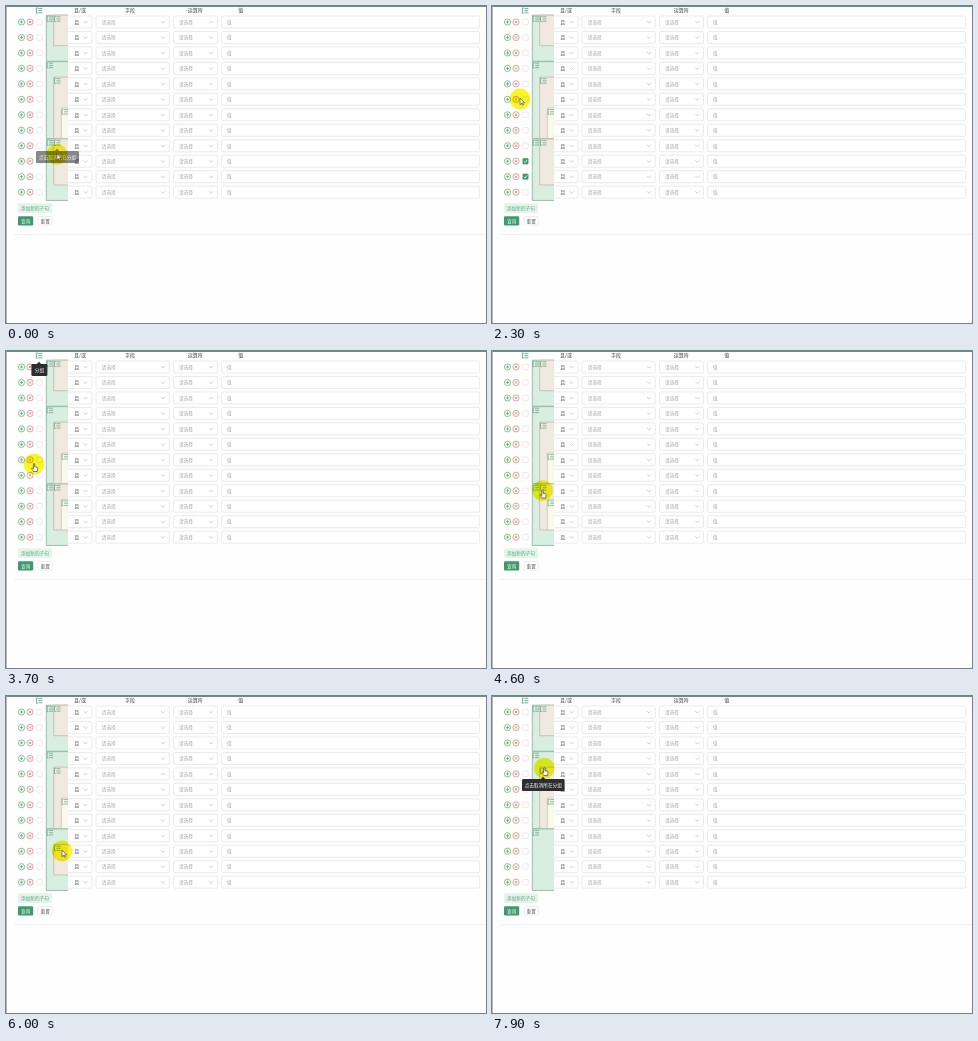
Write an HTML page that moves like this. It is 480x317 px and loops after 8000 ms.

```html
<!DOCTYPE html>
<html lang="zh-CN">
<head>
<meta charset="utf-8">
<title>条件分组</title>
<style>
html, body { margin: 0; width: 100%; height: 100%; overflow: hidden; background: #fefefe; }
svg { display: block; width: 100vw; height: 100vh; }
text { font-family: "Noto Sans CJK SC", "Noto Sans CJK", "Noto Sans CJK JP", sans-serif; font-size: 4.65px; }
#spot { mix-blend-mode: multiply; }
</style>
</head>
<body>
<svg id="stage" viewBox="0 0 480 317"></svg>
<script>
const LOOP = 8000, STEP = 100, PITCH = 15.47, ROWS = 12;
const GREEN = '#3d9a6c';
const stage = document.getElementById('stage');

function el(name, attrs, parent = stage) {
  const node = document.createElementNS('http://www.w3.org/2000/svg', name);
  for (const key in attrs) node.setAttribute(key, attrs[key]);
  parent.appendChild(node);
  return node;
}
const rect = (x, y, width, height, fill, more, parent) =>
  el('rect', { x, y, width, height, fill, ...more }, parent);
const path = (d, stroke, width, more, parent) =>
  el('path', { d, fill: 'none', stroke, 'stroke-width': width, ...more }, parent);
function label(str, x, y, fill, more, parent) {
  el('text', { x, y: y + 1.75, fill, ...more }, parent).textContent = str;
}
const show = (node, on) => node.setAttribute('visibility', on ? 'visible' : 'hidden');
const rowY = i => 16 + i * PITCH;
const edgeY = i => 9 + i * PITCH;

function listIcon(x, y, color, parent) {
  path(`M${x + 1.8} ${y + .4}h-1.4v5.2h1.4M${x + 2.4} ${y + .8}h4M${x + 2.4} ${y + 3}h4M${x + 2.4} ${y + 5.2}h4`,
    color, .75, {}, parent);
}

function box(x, y, w, chevron) {
  rect(x, y - 6, w, 12, '#fff', { rx: 1.6, stroke: '#dfe1e4', 'stroke-width': .65 });
  if (chevron) path(`M${chevron - 2} ${y - .9}l2 2l2-2`, '#b4b7bc', .65);
}

// Page frame and header
rect(0, 0, 480, .9, '#4d8873');
rect(0, 0, .8, 317, '#a3aaa7');
listIcon(30, 1.6, GREEN);
const bold = { 'text-anchor': 'middle', 'font-weight': 500, 'font-size': 5 };
[['且/或', 74], ['字段', 124], ['运算符', 189.3], ['值', 234.7]]
  .forEach(([str, x]) => label(str, x, 4, '#444', { ...bold, style: 'font-size:5px' }));

// Groups: depth, first row, row past the last, shown from, shown until
const FILLS = ['#d8eee0', '#f0e9e0', '#f8f9e9'];
const EDGES = ['#7fab95', '#b5b0a2', '#bcc0a6'];
const LEFTS = [40, 47.4, 55];
const groups = [
  [0, 0, 3], [1, 0, 2],
  [0, 3, 8], [1, 4, 8], [2, 6, 8],
  [0, 8, 12], [1, 8, 11, 0, 5000], [2, 9, 11, 3300, 5000], [1, 9, 11, 5000, 6700]
].map(([depth, a, b, from = 0, until = LOOP]) => {
  const node = el('g', {});
  const x = LEFTS[depth], y = edgeY(a), h = edgeY(b) - y;
  rect(x, y, 62 - x, h, FILLS[depth], {}, node);
  path(`M62 ${y + .2}H${x + .3}V${y + h - .2}H62`, EDGES[depth], .7, {}, node);
  listIcon(x + .7, y + 1, '#67a085', node);
  return { node, from, until };
});

// Condition rows
const ticks = [];
for (let i = 0; i < ROWS; i++) {
  const y = rowY(i);
  el('circle', { cx: 15.5, cy: y, r: 3.1, fill: '#fbfefb', stroke: '#60ae70', 'stroke-width': .75 });
  path(`M13.9 ${y}h3.2M15.5 ${y - 1.6}v3.2`, '#4d9d60', .7);
  el('circle', { cx: 24, cy: y, r: 3.1, fill: '#fffbfa', stroke: '#d28780', 'stroke-width': .75 });
  path(`M22.9 ${y - 1.1}l2.2 2.2m0-2.2l-2.2 2.2`, '#c87169', .7);
  rect(30.8, y - 2.7, 5.4, 5.4, '#fff', { rx: .8, stroke: '#dcdfe2', 'stroke-width': .6 });
  const tick = el('g', {});
  rect(30.6, y - 2.9, 5.8, 5.8, GREEN, { rx: .8 }, tick);
  path(`M32 ${y}l1.2 1.3l2-2.6`, '#fff', .8, {}, tick);
  ticks.push(tick);

  rect(62, y - 6, 24, 12, '#fff');
  path(`M62 ${y - 6}H84.5q1.5 0 1.5 1.5v9q0 1.5-1.5 1.5H62`, '#dfe1e4', .65);
  path(`M77.6 ${y - .9}l2 2l2-2`, '#b4b7bc', .65);
  box(90, y, 73.3, 157);
  box(167.5, y, 44, 205.3);
  box(215.6, y, 258, 0);
  label('且', 68.2, y, '#555', { style: 'font-size:5px' });
  label('请选择', 95.8, y, '#a5a8ad');
  label('请选择', 173, y, '#a5a8ad');
  label('值', 221, y, '#a5a8ad');
}
const hoverBox = rect(30.8, rowY(9) - 2.7, 5.4, 5.4, 'none', { rx: .8, stroke: GREEN, 'stroke-width': .7 });

// Buttons
rect(12, 197.2, 34, 9.8, '#e5f4eb', { rx: 1.4 });
label('添加新的子句', 15, 202, '#55a67d');
rect(12, 210.2, 15.2, 9.2, GREEN, { rx: 1.2 });
label('查询', 15, 214.8, '#fff');
rect(32, 210.5, 14.2, 8.6, '#fff', { rx: 1.2, stroke: '#dfe1e4', 'stroke-width': .6 });
label('重置', 34.6, 214.8, '#555');
rect(8, 228, 472, .8, '#eceeef');

// Tooltips: text, left, top, width, arrow x, shown from, starts fading
const UNGROUP = '点击取消所在分组';
const tips = [
  [UNGROUP, 30, 145, 43, 51, -900, -80],
  ['分组', 25.4, 13, 16, 33, 2900, 3700],
  [UNGROUP, 30, 145, 43, 51, 4700, 5400],
  [UNGROUP, 30, 160.5, 43, 51, 6250, 6850],
  [UNGROUP, 30, 83, 42.6, 51, 7500, 9000]
].map(([str, x, y, w, ax, from, until]) => {
  const node = el('g', {});
  rect(x, y, w, 12, '#2b2d2e', { rx: 1.3 }, node);
  el('path', { d: `M${ax - 2.2} ${y + .1}l2.2-2.3l2.2 2.3z`, fill: '#2b2d2e' }, node);
  label(str, x + w / 2, y + 6, '#fff', { 'text-anchor': 'middle' }, node);
  return { node, from, until };
});

// Pointer
const spot = el('circle', { id: 'spot', r: 10.4, fill: '#fbf516', 'fill-opacity': .94 });
const arrow = path('M0-1v6.6l1.5-1.4l1 2.2l1-.5l-1-2.1h2z', '#222', .55, { fill: '#fff' });
const hand = path('M-.6-.2q.7-.8 1.3 0v2.9l2.4.6q.7.3.6 1l-.5 3.2h-3.6l-2-2.7q-.2-.9.7-.7l1.1.8z',
  '#222', .6, { fill: '#fff' });

// time, x, y, hand pointer until the next key
const keys = [
  [0, 51, 148.5, 0], [300, 49, 153, 0], [900, 33.4, 156, 1], [1400, 33, 156, 1],
  [1700, 33.4, 171, 1], [1900, 33.4, 171, 0], [2300, 28, 93, 0], [2700, 33, 5, 1],
  [3400, 33, 5, 0], [3700, 28, 113, 1], [3900, 30, 126, 0], [4400, 50.5, 139.5, 1],
  [5100, 50.5, 140, 1], [5400, 53, 147, 0], [5800, 57, 157, 0], [6000, 56, 155, 0],
  [6200, 52, 152.5, 1], [6800, 52, 152.5, 0], [7300, 52.5, 73, 1], [8000, 52.3, 72, 1]
];

function pointerAt(t) {
  const i = keys.findIndex((k, n) => n && t < k[0]);
  const a = keys[i - 1], b = keys[i];
  const u = (t - a[0]) / (b[0] - a[0]);
  const e = u * u * (3 - 2 * u);
  return { x: a[1] + (b[1] - a[1]) * e, y: a[2] + (b[2] - a[2]) * e, hand: a[3] };
}

const clamp = v => Math.max(0, Math.min(1, v));
const during = (t, from, until) => t >= from && t < until;

function draw(t) {
  groups.forEach(g => show(g.node, during(t, g.from, g.until)));
  ticks.forEach((node, i) => show(node,
    i === 9 && during(t, 1300, 3300) || i === 10 && during(t, 1800, 3300)));
  show(hoverBox, during(t, 900, 1300));
  tips.forEach(p => p.node.setAttribute('opacity',
    Math.min(clamp((t - p.from) / 200), clamp(1 - (t - p.until) / 180))));
  const p = pointerAt(t);
  const place = `translate(${p.x.toFixed(2)} ${p.y.toFixed(2)})`;
  [spot, arrow, hand].forEach(node => node.setAttribute('transform', place));
  show(hand, p.hand);
  show(arrow, !p.hand);
}

const start = performance.now();
function frame() {
  const t = (performance.now() - start) % LOOP;
  draw(Math.floor(t / STEP) * STEP);
  requestAnimationFrame(frame);
}
draw(0);
requestAnimationFrame(frame);
</script>
</body>
</html>
```
